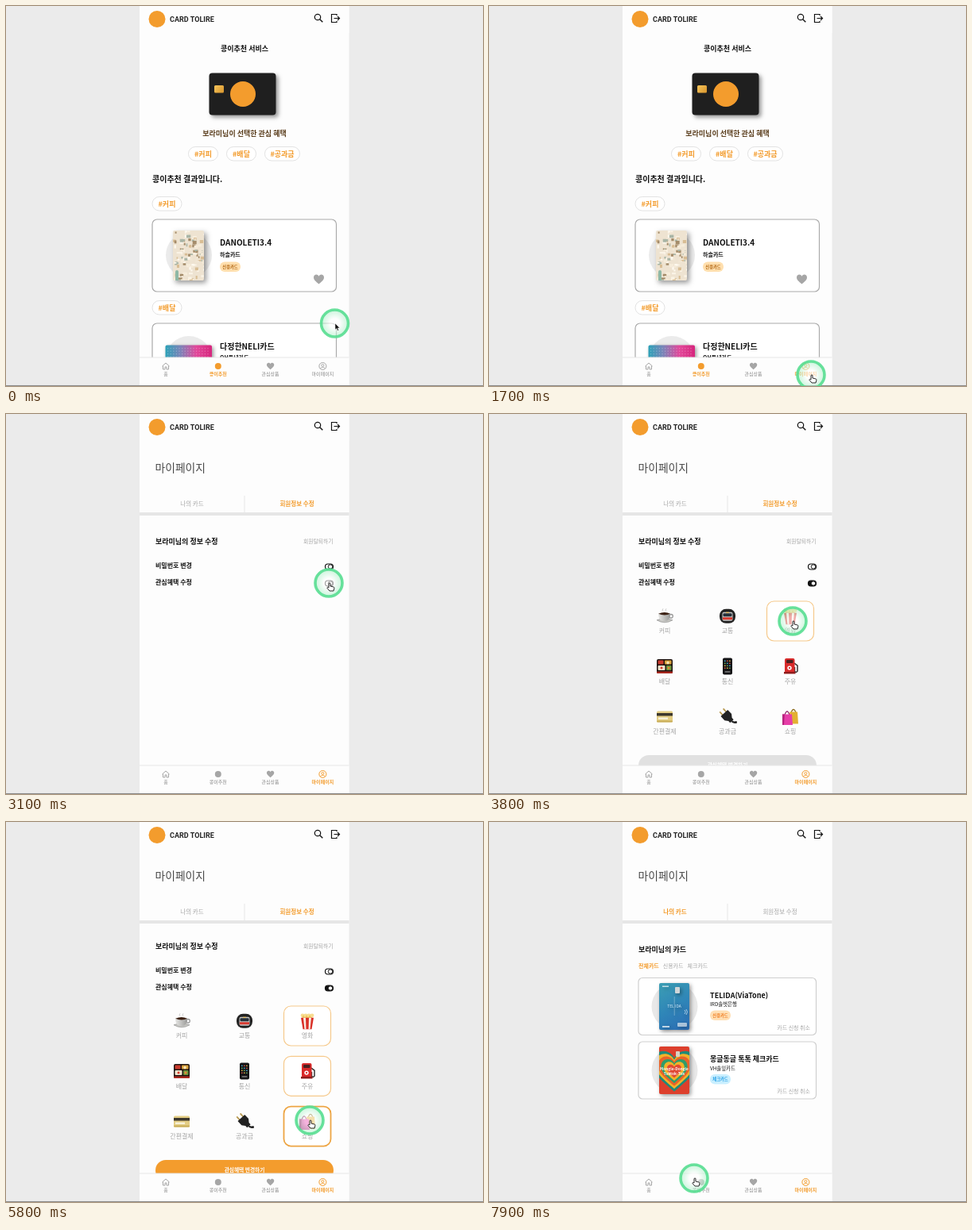
Recreate the animation shown at these times as an HTML page with a canvas. Size 600 by 479 pixels, loop 8 s.

```html
<!DOCTYPE html>
<html lang="ko">
<head>
<meta charset="utf-8">
<style>
html, body { margin: 0; width: 100%; height: 100%; overflow: hidden; background: #ebebeb }
canvas { display: block }
</style>
</head>
<body>
<canvas id="stage" width="600" height="479"></canvas>
<script>
const c = document.getElementById('stage').getContext('2d');
const ORANGE = '#f39c2d', GRAY = '#a6a6a6', INK = '#111', LOOP = 8000;
const HEART = new Path2D('M0 6C-4 2.500-6.500.500-6.500-2.300C-6.500-6.500-1.500-7 0-3.800C1.500-7 6.500-6.500 6.500-2.300C6.500.500 4 2.500 0 6Z');

// ---- drawing helpers ----
function rect(x, y, w, h, fill, r = 0, line, width = 1) {
  c.beginPath();
  c.roundRect(x, y, w, h, r);
  if (fill) { c.fillStyle = fill; c.fill(); }
  if (line) { c.strokeStyle = line; c.lineWidth = width; c.stroke(); }
}
function circle(x, y, r, fill, line, width = 1) {
  c.beginPath();
  c.arc(x, y, r, 0, 7);
  if (fill) { c.fillStyle = fill; c.fill(); }
  if (line) { c.strokeStyle = line; c.lineWidth = width; c.stroke(); }
}
function path(d, fill, line, width = 1) {
  const p = d instanceof Path2D ? d : new Path2D(d);
  if (fill) { c.fillStyle = fill; c.fill(p); }
  if (line) { c.strokeStyle = line; c.lineWidth = width; c.stroke(p); }
}
function at(x, y, draw, scale = 1) {
  c.save();
  c.translate(x, y);
  c.scale(scale, scale);
  draw();
  c.restore();
}
// y is the vertical middle of the glyphs
function text(s, x, y, size, color = INK, weight = 700, align = 'left', family = '"Noto Sans CJK KR"') {
  c.font = `${weight} ${size}px ${family}, "Noto Sans CJK", "Noto Sans", sans-serif`;
  c.textAlign = align;
  c.fillStyle = color;
  c.fillText(s, x, y + size * 0.37);
}
function shadowed(draw, dx = 2, dy = 2, blur = 5) {
  c.save();
  c.shadowColor = 'rgba(0,0,0,.4)';
  c.shadowOffsetX = dx; c.shadowOffsetY = dy; c.shadowBlur = blur;
  draw();
  c.restore();
}
function clip(x, y, w, h, draw, r = 0) {
  c.save();
  c.beginPath();
  c.roundRect(x, y, w, h, r);
  c.clip();
  draw();
  c.restore();
}
function blend(x0, y0, x1, y1, ...colors) {
  const g = c.createLinearGradient(x0, y0, x1, y1);
  colors.forEach((color, i) => g.addColorStop(i / (colors.length - 1), color));
  return g;
}
function random(seed) {
  return () => (seed = seed * 16807 % 2147483647) / 2147483647;
}

// ---- pointer ----
const stops = [
  [0, 413.5, 400], [900, 413.5, 400], [1200, 434, 430], [1500, 405, 465], [2000, 405, 465],
  [2400, 370, 111], [2800, 370, 111], [3100, 406, 213], [3400, 406, 213], [3700, 382, 261],
  [4500, 382, 261], [4900, 381, 318], [5200, 381, 318], [5600, 382, 376], [5900, 382, 376],
  [6300, 335, 388], [6800, 335, 388], [7200, 392, 31], [7400, 392, 31], [7900, 258, 449], [8100, 258, 449]
];
const handTimes = [[1500, 2000], [2400, 2800], [3100, 3400], [3700, 6600], [7800, 8000]];

function pointerAt(t) {
  const i = stops.findIndex(s => s[0] > t);
  const [t0, x0, y0] = stops[i - 1], [t1, x1, y1] = stops[i];
  const u = (t - t0) / (t1 - t0), k = u * u * (3 - 2 * u);
  return [x0 + (x1 - x0) * k, y0 + (y1 - y0) * k];
}
function pointer(t) {
  const [x, y] = pointerAt(t), [px, py] = pointerAt(t + 20);
  const glow = c.createRadialGradient(x, y, 6, x, y, 16);
  glow.addColorStop(0, 'rgba(255,255,255,.6)');
  glow.addColorStop(1, 'rgba(165,238,195,.5)');
  circle(x, y, 17, glow, 'rgba(88,222,146,.9)', 3.6);
  const hand = handTimes.some(([a, b]) => t >= a && t <= b);
  at(px, py, () => hand
    ? path('M0 1C0-.500 2-.500 2 1V4L6 5C7 5.300 7 6 6.800 7L6 10H1L-2 6.500C-2.500 5.500-1 5 0 6Z', '#fff', '#111', .9)
    : path('M.500 0V8L2.300 6.400L3.600 9.300L5 8.700L3.800 5.900H6.300Z', '#111', '#fff', .5));
}

// ---- frame of the app ----
function header() {
  rect(168, 0, 264, 34, '#fdfdfd');
  circle(190, 16.500, 10.500, ORANGE);
  text('CARD TOLIRE', 206, 17, 9, '#222', 700, 'left', 'Roboto');
  circle(392, 14, 3.700, null, INK, 1.200);
  path('M394.700 16.700L398.300 20.300', null, INK, 1.400);
  path('M416 12V10.500H409.500V20.500H416V19M412.500 15.500H419M417 13L419.500 15.500L417 18', null, INK, 1.200);
}
function nav(active, hover) {
  rect(168, 443, 264, 36, '#fdfdfd');
  rect(168, 442.500, 264, 1, '#e8e8e8');
  const icons = [
    color => path('M-4.500 0L0-4L4.500 0M-3.500-.500V4H-1V1H1V4H3.500V-.500', null, color),
    color => circle(0, 0, 4, color),
    color => at(0, 0, () => path(HEART, color), .72),
    color => {
      circle(0, 0, 4.500, null, color);
      circle(0, -1, 1.500, null, color, .9);
      path('M-3 3C-2 1 2 1 3 3', null, color, .9);
    }
  ];
  ['홈', '콩이추천', '관심상품', '마이페이지'].forEach((label, i) => {
    const x = 201 + 65.800 * i, color = i === active || i === hover ? ORANGE : GRAY;
    at(x, 454, () => icons[i](color));
    text(label, x, 464, 6, color === GRAY ? '#888' : color, color === GRAY ? 400 : 700, 'center');
  });
}

// ---- recommendation page ----
function chip(label, x, y, w) {
  rect(x, y, w, 17.500, '#fff', 8.700, '#e2e2e2');
  text(label, x + w / 2, y + 9, 9, ORANGE, 700, 'center');
}
function collage(x, y, w, h) {
  const rnd = random(47), tones = ['#d8bd94', '#fdf8ee', '#f1e6d4', '#a9b5a6', '#f6ecda', '#a58c6a', '#faf3e6'];
  shadowed(() => rect(x, y, w, h, '#eee3d1', 2), 3, 3, 6);
  clip(x, y, w, h, () => {
    for (let i = 0; i < 110; i++)
      rect(x + rnd() * w, y + rnd() * h, 1.500 + rnd() * 4, 1.500 + rnd() * 3, tones[i % 7]);
    rect(x + 3, y + 50, 4, 14, '#8fb8a6', 2);
  }, 2);
}
function recommendPage(hover) {
  text('콩이추천 서비스', 300, 53.500, 9, INK, 700, 'center');
  shadowed(() => rect(255.500, 84.500, 84, 53, '#1f1f1f', 4), 3, 3, 5);
  rect(262, 100, 12, 9.500, blend(262, 100, 274, 110, '#f6c65c', '#d8942c'), 1.500);
  circle(298, 111, 16, ORANGE);
  text('보라미님이 선택한 관심 혜택', 300, 161, 9, '#5a3d1c', 700, 'center');
  chip('#커피', 229.500, 177.500, 37);
  chip('#배달', 277.500, 177.500, 37);
  chip('#공과금', 325.500, 177.500, 44);
  text('콩이추천 결과입니다.', 184, 218.500, 10);
  chip('#커피', 184, 240.500, 37);
  chip('#배달', 184, 371.500, 37);

  rect(184, 269, 231.500, 91, '#fff', 6, '#aaa', 1.200);
  circle(230, 314, 29, '#ebebeb');
  collage(210, 283, 39, 63);
  text('DANOLETI3.4', 269, 298.500, 10);
  text('하솔카드', 269, 313, 7);
  rect(269, 322.500, 26, 12.500, '#ffdfae', 6);
  text('신용카드', 282, 328.700, 5.300, '#b0640f', 700, 'center');
  at(393.500, 344.500, () => path(HEART, GRAY));

  rect(184, 400, 231.500, 91, '#fff', 6, '#aaa', 1.200);
  circle(230, 445, 29, '#ebebeb');
  shadowed(() => rect(200.500, 427.500, 58.500, 37, blend(200, 0, 259, 0, '#2aa3b8', '#7d83b8', '#e2489a', '#d6257d'), 2));
  for (let i = 0; i < 60; i++)
    rect(203 + i % 15 * 3.600, 431 + (i / 15 | 0) * 3.500, 1.200, 1.200, 'rgba(255,255,255,.28)');
  text('다정한NELI카드', 269, 429.500, 10);
  text('QH들녘카드', 269, 443, 7);
  nav(1, hover);
}

// ---- my page ----
function myHeader(tab) {
  rect(168, 34, 264, 90, '#fdfdfd');
  text('마이페이지', 187.500, 68, 13.800, '#484848', 300);
  text('나의 카드', 234, 113, 7.500, tab ? GRAY : ORANGE, tab ? 400 : 700, 'center');
  text('회원정보 수정', 366, 113, 7.500, tab ? ORANGE : GRAY, tab ? 700 : 400, 'center');
  rect(299.500, 103, 1, 21, '#e8e8e8');
  rect(168, 124, 264, 4, '#e6e6e6');
}
function blueCard() {
  rect(214, 203, 38, 59, blend(214, 203, 252, 262, '#3c9fb4', '#2f86b8', '#2b6bb4'), 2);
  text('TEL IDA', 233, 232, 5, '#d8f0ff', 400, 'center');
  rect(232.800, 220, .7, 24, 'rgba(255,255,255,.45)');
  rect(218, 206.500, 8, 1.500, 'rgba(255,255,255,.7)');
  rect(218, 257, 9, 2, 'rgba(255,255,255,.7)');
  rect(237, 253, 12, 5, 'rgba(255,255,255,.6)', 1);
  rect(234, 208, 6, 8, '#cfd6d8', 1);
  path('M246 237Q248.500 239.500 246 242M248 236Q251 239.500 248 243', null, '#d8f0ff', .7);
}
function heartCard() {
  const tones = ['#1f8a78', '#f3b229', '#e8632a', '#2f9d6a', '#f3b229', '#e04a35'];
  rect(214, 283, 38, 60, '#dd3f2c', 2);
  c.shadowColor = 'transparent';
  clip(214, 283, 38, 60, () =>
    tones.forEach((tone, i) => at(233, 314, () => path(HEART, tone), 4.300 - i * .58)), 2);
  text('Mongle-Dongle', 233, 311, 4.800, '#fff', 700, 'center');
  text('Toktok-Tok', 233, 317, 4.800, '#fff', 700, 'center');
  rect(235, 289, 5, 7, '#d8d2c4', 1);
}
function cardRow(y, name, bank, badge, tint, color, art) {
  rect(188, y, 223.500, 72, '#fff', 5, '#cfcfcf', 1.200);
  circle(233.500, y + 36, 29, '#e8e8e8');
  shadowed(art);
  text(name, 278, y + 22, 9);
  text(bank, 278, y + 33.500, 6.400, INK, 500);
  rect(278, y + 41, 26, 12.500, tint, 6);
  text(badge, 291, y + 47.300, 5.300, color, 700, 'center');
  text('카드 신청 취소', 404, y + 62.500, 7, GRAY, 400, 'right');
}
function cardsPage(loaded) {
  myHeader(0);
  if (loaded) {
    text('보라미님의 카드', 188, 160.500, 9);
    text('전체카드', 188, 181, 7, ORANGE);
    text('신용카드', 218.700, 181, 7, GRAY, 500);
    text('체크카드', 249.500, 181, 7, GRAY, 500);
    cardRow(196.500, 'TELIDA(ViaTone)', 'IRD솔벗은행', '신용카드', '#ffe0b5', '#f07a1c', blueCard);
    cardRow(277, '몽글동글 톡톡 체크카드', 'VH솔잎카드', '체크카드', '#c9efff', '#259fe6', heartCard);
  }
  nav(3);
}

const icons = {
  커피() {
    path('M-10 5Q0 11 10 5Q0 1-10 5Z', '#c4c4c0', '#8a8a8a', .6);
    path('M-8-3H7Q7 6.500-.500 6.500Q-8 6.500-8-3Z', blend(-8, 0, 7, 0, '#e6e6e4', '#9c9c9a'));
    circle(8, 0, 2.300, null, '#999', 1.300);
    path('M-8-3Q0-6.500 7-3Q0 .500-8-3Z', '#3c2114');
    path('M-2-6Q-4-7.500-2-9.500M2-6Q0-7.500 2-9.500', null, '#c4c4c4', .9);
  },
  교통() {
    rect(-10, -9, 20, 18, '#222', 8);
    rect(-6.500, -5, 13, 11, '#c8c8c8', 2);
    rect(-5.500, -3.500, 11, 4, '#26303a', 1);
    rect(-6, 1.500, 12, 3, '#d83a30');
    rect(-2, -5, 4, 1, '#f6c34a');
  },
  영화() {
    for (let i = 0; i < 7; i++) circle(-6 + i * 2, -7 + i % 2 * 2, 2.400, i % 2 ? '#f0c860' : '#f8dd92');
    path('M-8-4H8L5.500 10.500H-5.500Z', '#d92f27');
    path('M-5-4H-2L-1.500 10.500H-3.500ZM2-4H5L3.500 10.500H1.500Z', '#f8eee4');
  },
  배달() {
    rect(-10, -9, 20, 18, '#1f1512', 2);
    rect(-8.500, -7.500, 7, 5, '#c93a2c', 1);
    rect(0, -7.500, 8.500, 5, '#d9a13c', 1);
    rect(-8.500, -1, 9, 6, '#efe3cb', 1);
    rect(2, -1, 6.500, 6, '#6a963c', 1);
    circle(-4, 2, 1.500, '#d93a2c');
    circle(4, -4.500, 1.800, '#f5e4b8');
    circle(5, 2, 1.600, '#e88a3a');
    rect(-10, 6.500, 20, 2.500, '#a8281f', 1);
  },
  통신() {
    rect(-6, -10.500, 12, 21, '#151517', 2);
    const tones = ['#4bb5e8', '#e85a4b', '#f3c14b', '#6ac06a'];
    for (let i = 0; i < 12; i++) rect(-3.900 + i % 3 * 3, -7.500 + (i / 3 | 0) * 3, 1.500, 1.500, tones[i % 4], .4);
    rect(-3.500, 6, 7, 1.800, '#666', 1);
  },
  주유() {
    path('M5-4L9-1V6Q7 9 5.500 6V1', null, '#333', 1.500);
    rect(-7, -10, 12.500, 18, '#d92b2b', 2);
    rect(-5, -8, 8.500, 4, '#4a2020', 1);
    circle(-1, 2, 2.700, '#fff');
    circle(-1, 2, 1.200, '#d92b2b');
    rect(-8, 7, 14.500, 2.500, '#8f1c1c');
  },
  간편결제() {
    rect(-10, -7, 20, 14, '#e3cd84', 1.500);
    rect(-10, -4.500, 20, 3.500, '#3c372c');
    rect(-8, 1, 12, 2.500, '#f7f0d6');
    rect(-10, 5, 20, 2, '#c9ad58', 1);
  },
  공과금() {
    c.rotate(-.75);
    rect(-4, -11, 1.800, 6, '#b89a52');
    rect(2, -11, 1.800, 6, '#b89a52');
    path('M-6-6H6V1L3 5V8H-3V5L-6 1Z', '#222');
    path('M0 8Q0 11 4 13', null, '#222', 2.500);
  },
  쇼핑() {
    path('M1-5Q4-13 7-5', null, '#8a6a1c', 1.200);
    path('M-1-6L9-6L10 9L0 9Z', '#e3b032');
    path('M-7-2Q-4-11-1-2', null, '#8a1c62', 1.200);
    path('M-10-3L2-3L3 10.500L-10 10.500Z', '#e63ea8');
    path('M-10-3L-7-3L-8 10.500L-10 10.500Z', '#b8247f');
  }
};

function toggle(y, on) {
  rect(401.500, y - 3.500, 10, 7, on ? INK : '#fff', 3.500, INK, 1.200);
  circle(408, y, 2.700, '#fff', INK, 1);
}
function editPage(t) {
  const open = t >= 3300, ready = t >= 5700;
  const hoverFrom = { 영화: 3700, 주유: 4800, 쇼핑: 5500 };
  const scroll = t >= 6000 ? 44 : t >= 4300 ? 4 : 0;
  at(0, -scroll, () => {
    text('보라미님의 정보 수정', 188, 160.500, 9);
    text('회원탈퇴하기', 411.500, 160.500, 6.800, GRAY, 400, 'right');
    text('비밀번호 변경', 188, 191, 8);
    text('관심혜택 수정', 188, 212, 8);
    toggle(192.500, false);
    toggle(213.500, open);
    if (!open) return;
    Object.keys(icons).forEach((name, i) => {
      const x = 221 + i % 3 * 79, y = 236 + (i / 3 | 0) * 63.300;
      if (t >= hoverFrom[name]) {
        const bold = name === '쇼핑' && t >= 5700 && t < 6000;
        rect(x - 29.500, y, 59, 50, '#fff', 9, bold ? '#eda544' : '#f6c98b', bold ? 1.800 : 1.200);
      }
      at(x, y + 18.800, icons[name]);
      text(name, x, y + 37.500, 8, GRAY, 400, 'center');
    });
    rect(188, 430, 224, 26, ready ? ORANGE : '#e1e1e1', 13);
    text('관심혜택 변경하기', 300, 442.500, 6.700, t >= 6400 ? '#3a2408' : '#fff', 700, 'center');
  });
  header();
  myHeader(1);
  nav(3);
}
function alertBox() {
  shadowed(() => rect(182, -8, 235.500, 56, '#fff', 3), 0, 1, 7);
  text('관심혜택 변경이 완료되었습니다.', 190, 9.500, 6.450, '#222', 500);
  rect(375.500, 23, 33.500, 17, '#1763cf', 2);
  text('확인', 392, 31.500, 5.700, '#fff', 700, 'center');
}

function draw(now) {
  const t = Math.floor(now % LOOP / 100) * 100;
  rect(0, 0, 600, 479, '#ebebeb');
  clip(168, 0, 263.500, 479, () => {
    rect(168, 0, 264, 479, '#fdfdfd');
    header();
    if (t < 1800) recommendPage(t >= 1500 ? 3 : -1);
    else if (t < 2800) cardsPage(t >= 1900);
    else if (t < 7400) editPage(t);
    else cardsPage(t >= 7500);
  });
  if (t >= 6700 && t < 7400) alertBox();
  rect(0, 478, 600, 1, '#8c8c8c');
  pointer(t);
}

const start = performance.now();
function tick() {
  draw(performance.now() - start);
  requestAnimationFrame(tick);
}
tick();
</script>
</body>
</html>
```
